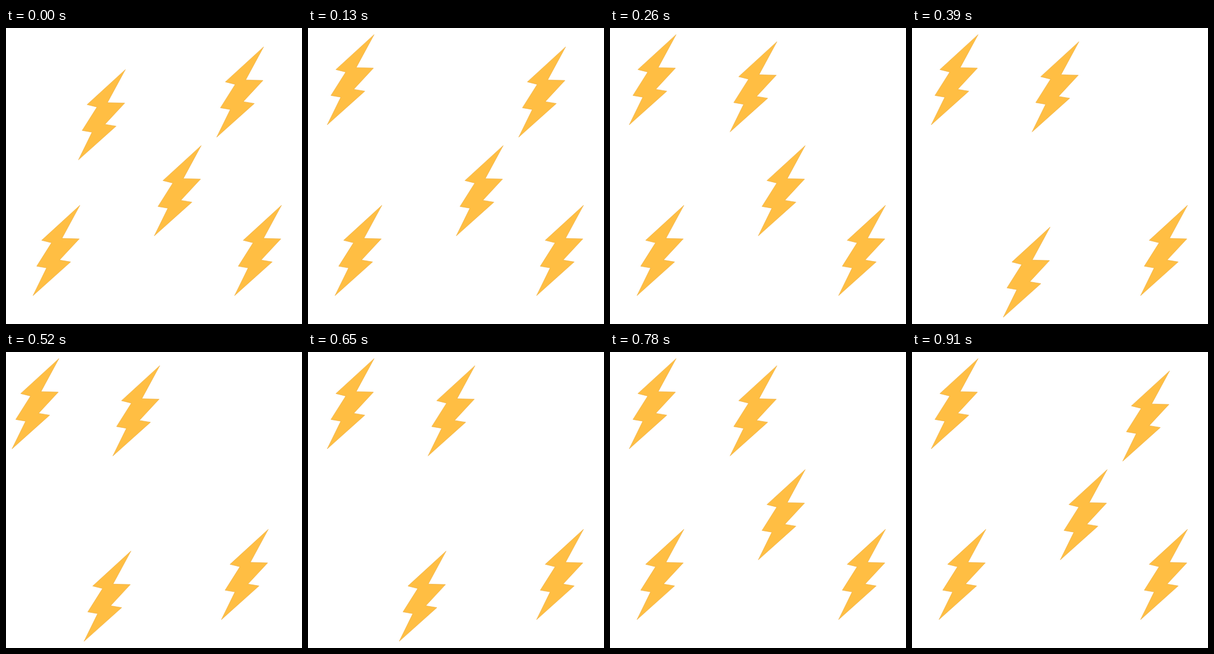
These frames come from a looping animation (480 px wide and 480 px high, 1040 ms). An HTML page with a canvas:

```html
<!DOCTYPE html>
<html lang="en">
<head>
<meta charset="utf-8">
<title>Lightning bolts</title>
<style>
  html, body { margin: 0; width: 100%; height: 100%; overflow: hidden; background: #fff; }
  canvas { display: block; width: 480px; height: 480px; }
</style>
</head>
<body>
<canvas id="stage" width="480" height="480"></canvas>
<script>
const ctx = document.getElementById("stage").getContext("2d");
const STEP = 130;
const STEPS = 8;

// Outline relative to the upper tip.
const outline = [
  [0, 0], [-29, 53.5], [-1, 54.3], [-33, 88.7], [-15, 91.7],
  [-76, 146.3], [-54, 101.5], [-70, 98.7], [-46, 60.7], [-62, 56.7]
];
const bolt = new Path2D();
outline.forEach(([x, y]) => bolt.lineTo(x, y));
bolt.closePath();

// Upper tips of the bolts.
const start = [193.5, 67.5];
const topLeft = [107.2, 10.7];
const topMid = [270.7, 22.2];
const topRight = [417.7, 30.7];
const center = [316.5, 190.7];
const lowLeft = [119.8, 287.6];
const lowMid = [224, 322.8];
const lowRight = [446.7, 287.6];

const spread = [topLeft, topRight, center, lowLeft, lowRight];
const gathered = [topLeft, topMid, lowMid, lowRight];
const poses = [
  [start, topRight, center, lowLeft, lowRight],
  spread,
  [topLeft, topMid, center, lowLeft, lowRight],
  gathered,
  gathered.map(([x, y]) => [x - 21.4, y])
];

function drawBolt([x, y]) {
  ctx.save();
  ctx.translate(x, y);
  ctx.fill(bolt);
  ctx.stroke(bolt);
  ctx.restore();
}

function draw(time) {
  const step = Math.floor(time / STEP) % STEPS;
  // The poses play forwards, then back.
  const pose = poses[Math.min(step, STEPS - step)];
  ctx.fillStyle = "#fff";
  ctx.fillRect(0, 0, 480, 480);
  ctx.fillStyle = "#ffbe43";
  ctx.strokeStyle = "#eaa93a";
  ctx.lineWidth = 0.6;
  ctx.lineJoin = "round";
  pose.forEach(drawBolt);
}

const origin = performance.now();
function tick() {
  draw(performance.now() - origin);
  requestAnimationFrame(tick);
}
tick();
</script>
</body>
</html>
```
